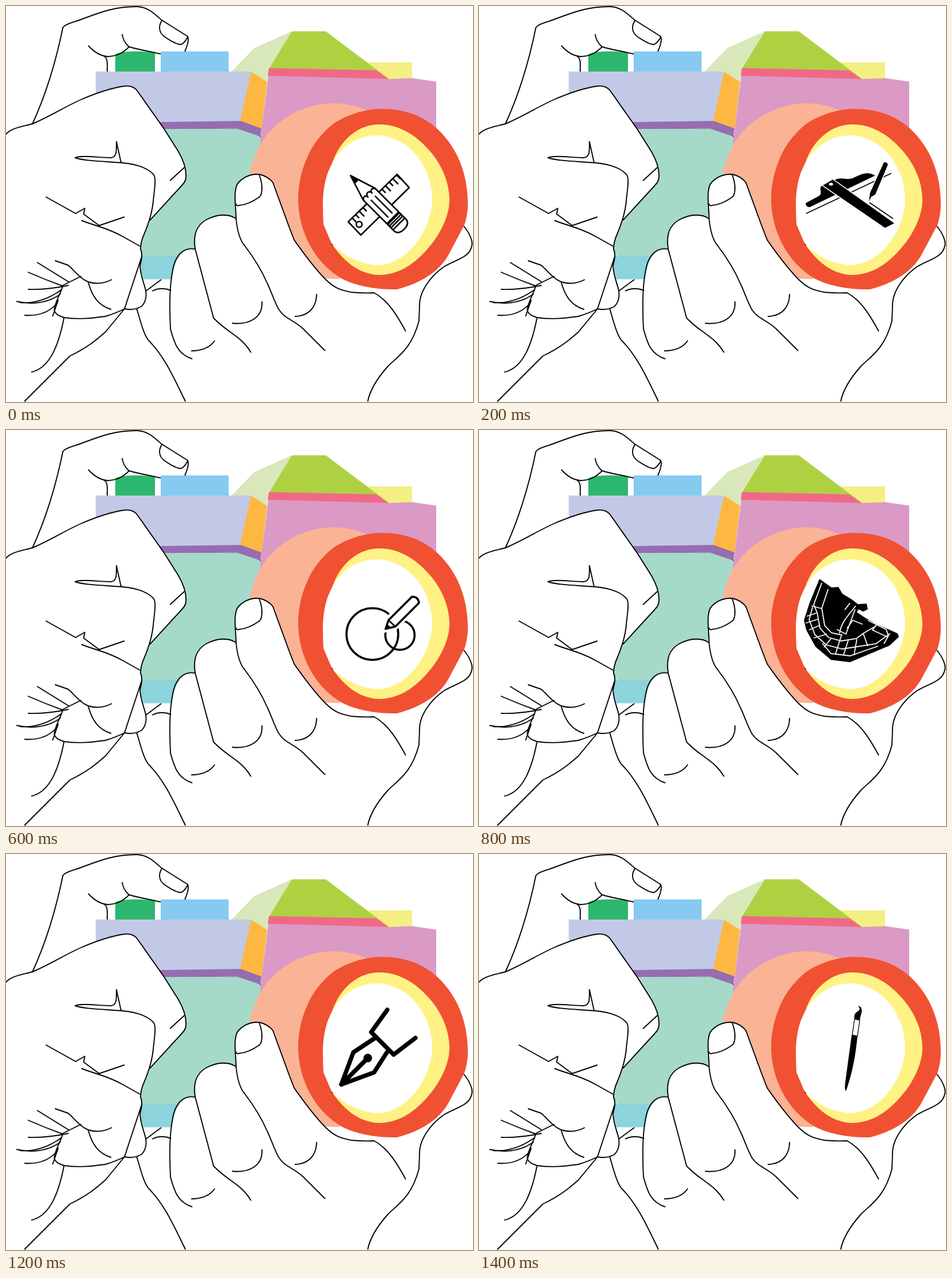
An HTML page for the animation above (1600 ms loop, 812 px wide and 689 px high).

```html
<!DOCTYPE html>
<html lang="en">
<head>
<meta charset="utf-8">
<title>Camera in hands</title>
<style>
html, body { margin: 0; width: 100%; height: 100%; overflow: hidden; background: #fff; }
svg { display: block; width: 100%; height: 100%; }
.skin { fill: #fff; }
.ink { fill: none; stroke: #000; stroke-width: 1.9; stroke-linejoin: round; }
.icon { visibility: hidden; animation: one 1600ms step-end infinite; animation-delay: calc(var(--at) - 1600ms); }
.two { animation-name: two; }
.line { fill: none; stroke: #000; }
.paper { fill: #fff; stroke: #000; }
.street { fill: none; stroke: #fff; stroke-width: 1.8; }
@keyframes one { 0% { visibility: visible; } 12.5%, 100% { visibility: hidden; } }
@keyframes two { 0% { visibility: visible; } 25%, 100% { visibility: hidden; } }
</style>
</head>
<body>
<svg viewBox="0 0 812 689" preserveAspectRatio="none">
  <!-- camera body -->
  <path fill="#d8e8ba" d="M392 114 432 73 497 44 457 108 454 132 426 114Z"/>
  <path fill="#f4ef82" d="M620 98H706V127H664Z"/>
  <path fill="#aed142" d="M497 44H556L666 127 457 109Z"/>
  <path fill="#f16887" d="M457 108 644 112 666 127.500 455 122Z"/>
  <path fill="#da9ac5" d="M456 121.500 666 127 706 125.500 748 131.500V300H440V245Z"/>
  <path fill="#85caf0" d="M269 79H387V115H269Z"/>
  <path fill="#2db66e" d="M190 84C201 79 216 79 235 79L259 81V114H190Z"/>
  <path fill="#a5d9c9" d="M265 213H403L442 226 440 320 400 435H225L250 300Z"/>
  <path fill="#8dd3dc" d="M225 435H310V475.500H225Z"/>
  <path fill="#c2c9e7" d="M156 114H426L408 201 260 203 156 170Z"/>
  <path fill="#fcb840" d="M426 114 454 132 444 214 407 201Z"/>
  <path fill="#966db0" d="M260 202 408 200 444 213 442 227 402 213.500 268 214Z"/>
  <path fill="#fab394" d="M424 292C427 272 434 255 443 240C468 198 515 170 570 169C590 170 608 173 626 181L640 400 580 475C545 476 530 470 500 440Z"/>
  <path d="m440.500 225 2.500 3" stroke="#000"/>

  <!-- hand areas covering the camera -->
  <path class="skin" d="M0 223C10 212 28 210 46 205C75 193 105 174 130 163Q174 144 205 139.500C217 138 224 141 230 150L275 214 299 252C308 267 313 282 313 295C313 303 311 307 305 313L250 373C245 391 234 407 234 423Q238 436 233 452L242 492 206 527 0 600Z"/>
  <path class="skin" d="M287 500C288 465 294 420 329 423C324 391 334 376 350 371C368 362 387 361 400 370L399 318C408 300 425 291 441 293Q455 296 464 307L491 381 501 407C520 434 541 461 556 476C575 495 590 495 640 499L640 640H290Z"/>

  <!-- lens -->
  <path fill="#f05133" d="M508 335C508 300 521 260 540 235C554 217 566 206 577 200C600 187 626 179 654 179C693 179 724 191 748 212C784 244 803 291 803 345Q803 363 797 381L772 428C757 459 726 481 680 493C646 494 611 488 585 475C536 447 508 391 508 335Z"/>
  <path fill="#fff284" d="M567 274C580 234 612 206 649 206C680 206 709 221 734 249C757 274 771 306 771 338C771 365 754 401 729 427C706 452 680 468 648 468C612 466 588 444 567 415Z"/>
  <path fill="#fff" d="M551 345C551 318 556 293 567 274C582 244 613 225 645 225C699 226 741 278 741 338C739 394 695 451 645 451C609 448 585 432 567 415L552 380Q551 362 551 345Z"/>
  <path d="m566 413 2.500 4" stroke="#000"/>

  <g class="ink">
    <!-- upper finger -->
    <path d="M46 205C74 144 89 86 99 37C104 31 115 29 129 24C166 10 190 1 227 1C245 1 258 13 270 24L316 53C319 60 315 70 311 79"/>
    <path d="M272 24C264 35 266 46 275 53C288 62 298 67 304 67Q310 65 316 54"/>
    <path d="M143 69C153 80 164 87 177 88C196 87 205 80 214 71C235 77 255 80 269 83.500M202 49C203 58 207 65 214 71M170 87C178 91 176 104 176 114"/>
    <!-- left fist -->
    <path d="M0 223C10 212 28 210 46 205C75 193 105 174 130 163Q174 144 205 139.500C217 138 224 141 230 150L275 214 299 252C308 267 313 282 313 295C313 303 311 307 305 313L250 373M285 304 310 281"/>
    <path d="M200 272 192 236C192 253 193 263 182 264C160 264 134 259 120 264C135 269 160 270 190 272C220 273 246 280 257 294C262 301 257 325 256 340C254 361 248 378 241 395Q234 410 234 423C238 432 236 440 233 452C234 470 240 482 243 495C245 508 241 518 235 523C226 528 216 529 206 527"/>
    <path d="M236 436 206 527M69 332 121 361 137 352 135 362 162 382 206 367M131 373C156 383 176 386 201 400L235 419"/>
    <path d="M85 443 108 451C121 462 128 474 143 480C158 485 172 482 184 476M143 481C150 505 160 521 183 528"/>
    <path d="M131 470 99 486C95 502 84 516 84 530C87 538 95 540 101 542C125 546 150 543 173 540Q192 534 206 527M91 511 81 540"/>
    <path d="M54 446 109 480M38 463Q68 476 98 487M38 493Q72 494 109 486M18 514C46 520 73 517 95 501M24 516Q61 519 96 494M32 538C57 540 76 532 89 517"/>
    <path d="M101 542C92 588 77 630 44 637M206 527 173 567C155 583 140 595 111 609L32 688M227 526C234 548 239 571 248 582C277 611 294 652 312 688M243 496 270 476M254 496Q270 488 287 495"/>
    <!-- right hand -->
    <path d="M329 423C313 420 300 428 293 447C283 480 284 525 286 562C293 588 299 606 324 614M322 600C340 600 355 594 363 582"/>
    <path d="M400 370C387 361 368 362 350 371C330 381 325 399 329 423L361 543C387 570 409 574 426 603M393 552C425 555 447 541 445 514"/>
    <path d="M400 370C400 350 395 325 402 310C410 299 425 291 441 293Q455 296 464 307L491 381 501 407C520 434 541 461 556 476C575 495 589 495 600 498Q622 500 640 499C665 512 682 542 695 566"/>
    <path d="M400 344Q401 349 405 347C417 346 430 340 441 332C447 325 446 308 440 293"/>
    <path d="M400 370C402 390 407 408 415 417C431 438 445 461 454 482C462 498 467 516 475 529C486 545 500 546 517 562L555 600M502 540C525 540 540 525 540 501"/>
    <path d="M796 383C806 395 812 409 810 417C806 438 784 440 761 454C737 471 718 498 719 523L718 548C705 598 680 610 663 628C642 652 632 672 629 688"/>
  </g>

  <!-- pencil and ruler -->
  <g class="icon" style="--at:0ms" stroke-width="2.600" stroke-linejoin="round">
    <path class="paper" d="M595 375.500 680 293 701 316 617 398.500Z"/>
    <path class="line" d="m602 369 7 7m-1-13 6 6m0-12 9 9m-2-15 6 6M654 319l6 6m0-12 9 9m-2-15 6 6m0-12 9 9m-2-15 6 6"/>
    <circle class="line" cx="614" cy="380" r="5"/>
    <g transform="translate(599 295) rotate(45)">
      <path class="paper" d="M0 0 46-14.500H104V14.500H46Z"/>
      <path class="paper" d="M50-14.500C42-15 40-5 48-5C40-5 40 5 48 5C40 5 42 15 50 14.500"/>
      <path d="M0 0 15-5Q17 0 15 5Z"/>
      <path class="line" d="M55-5H98M55 5H98"/>
      <path class="paper" d="M106-14.500H123Q132-13 132 0T123 14.500H106Z"/>
      <path class="line" d="M110-14V14M114-14V14M119-14V14"/>
    </g>
  </g>

  <!-- drafting square and pen -->
  <g class="icon two" style="--at:200ms">
    <path d="M568 343 592 330C598 325 590 317 596 313C607 309 610 306 620 302C632 297 639 304 651 299C662 294 671 289 682 292L689 295 575 350Q568 350 568 343Z"/>
    <path class="line" stroke-width="1.800" d="M569 361 717 291M679 342 720 370"/>
    <path d="M598 312 615 302 722 378 706 386Z" stroke="#fff" stroke-width="3" paint-order="stroke"/>
    <ellipse cx="612" cy="310" rx="3.600" ry="2.500" fill="#fff"/>
    <path d="M704 272Q709 271 711 276L689 328 682 332 678 340 680 325Z" stroke="#fff" stroke-width="3" paint-order="stroke"/>
  </g>

  <!-- circles and pencil -->
  <g class="icon" style="--at:600ms" stroke-width="3.600" stroke-linejoin="round">
    <circle class="line" cx="637" cy="355" r="45"/>
    <circle class="line" cx="685" cy="357" r="25.500"/>
    <path d="M659 347 664 330 706 289Q717 290 718 301L677 342Z" fill="#fff" stroke="#fff" stroke-width="11"/>
    <path class="paper" d="M660 346 665 331 706 290Q717 290 718 301L677 342Z"/>
    <path class="line" stroke-width="2.500" d="M665 331 677 342"/>
    <path d="m660 346 3-8 6 5Z"/>
  </g>

  <!-- town map -->
  <g class="icon" style="--at:800ms">
    <path d="M592 259 613 274 625 273 632 285 647 294 659 303 674 302 676 312 668 316 660 312 657 317 672 327 690 337 728 354 730 360 714 375 645 404 612 400 585 377 569 348 565 331 575 300Z"/>
    <path class="street" d="M596 266 582 304 588 318 593 345 608 361 630 367 656 363 668 354"/>
    <path class="street" d="M580 308 574 330 584 356 604 374 632 381 690 372 715 354"/>
    <path class="street" d="M607 277 596 310 601 340 613 353 632 357M597 371 612 389 645 393 694 376"/>
    <path class="street" d="M578 306 597 311M570 324 588 318M568 336 590 329M574 348 592 340M582 362 605 355M600 378 612 363M620 389 630 358M634 391 642 366M652 392 657 364M676 376 668 354 690 341"/>
    <path class="street" d="M676 331 708 347 712 358 704 372M692 338 684 348 710 360M627 354C629 335 642 323 655 306M622 347 638 355 654 312M640 345 650 331 667 338M645 301 636 313"/>
  </g>

  <!-- pen nib -->
  <g class="icon two" style="--at:1000ms" stroke-width="7.500" stroke-linejoin="round" stroke-linecap="round">
    <path class="line" d="M642 320 604 345 583 401 640 380 663 344M583 401 629 355"/>
    <path class="line" d="M663 271 635 310 674 349 712 320"/>
    <circle cx="629" cy="355" r="7.500"/>
  </g>

  <!-- brush -->
  <g class="icon" style="--at:1400ms">
    <path d="M648 315 658 317C655 350 649 382 638 413Q635 409 637 396Z"/>
    <path class="paper" stroke-width="1.300" d="M653 287 662 289 658 317 649 315Z"/>
    <path d="M653 287C651 280 655 275 660 273Q664 269 659 264C666 265 667 273 664 280L662 289Z"/>
  </g>
</svg>
</body>
</html>
```
